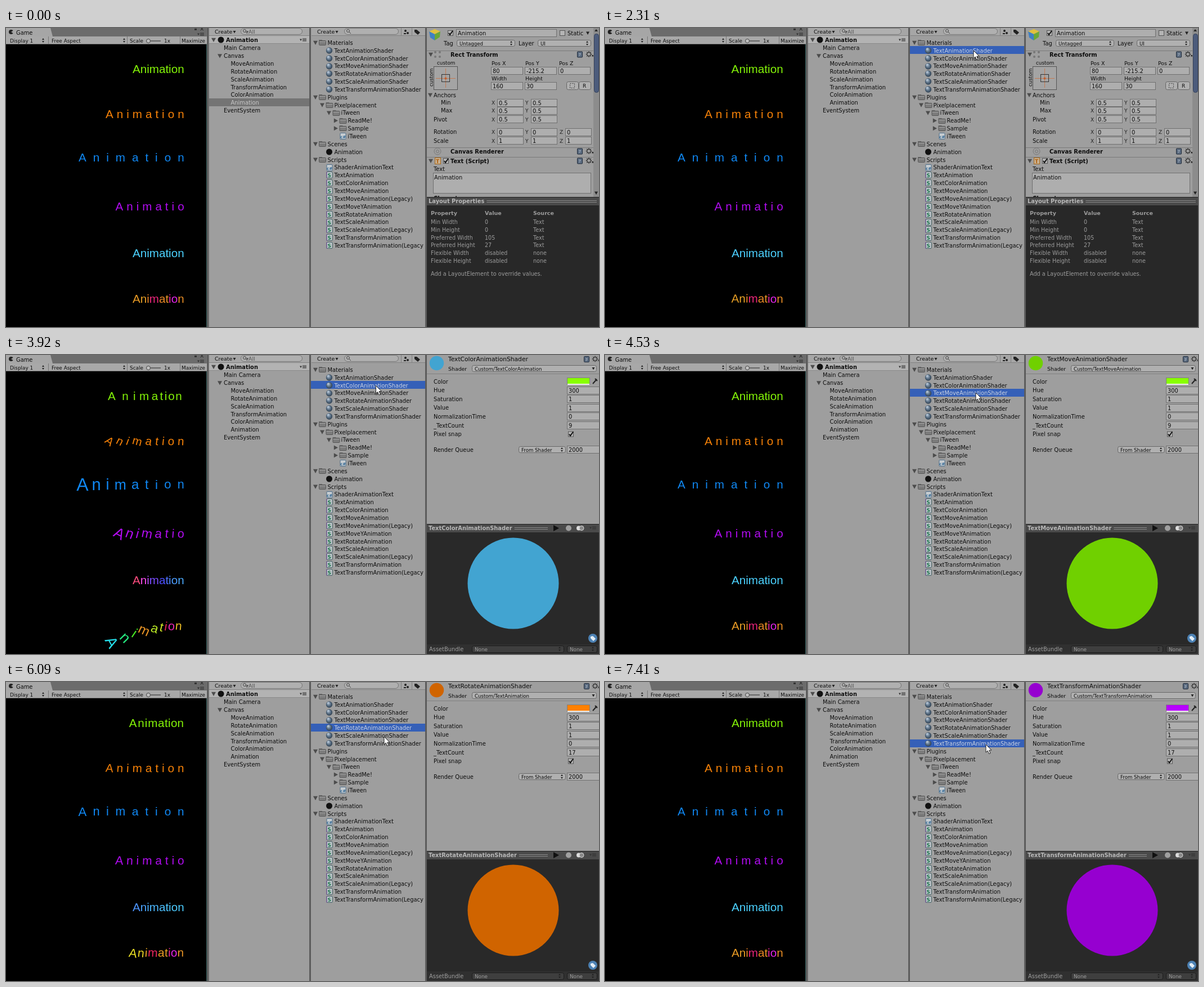
An HTML page with a canvas that plays this animation: 1054 by 531 pixels, repeating every 7720 ms.

```html
<!DOCTYPE html>
<html>
<head>
<meta charset="utf-8">
<style>
html, body { margin: 0; width: 100%; height: 100%; overflow: hidden; background: #000; }
canvas { display: block; width: 1054px; height: 531px; }
</style>
</head>
<body>
<canvas id="stage" width="1054" height="531"></canvas>
<script>
const g = document.getElementById('stage').getContext('2d');
const LOOP = 7720;
const UI = '"DejaVu Sans", Verdana, sans-serif';
const GAME = '"Liberation Sans", Arial, sans-serif';
const INK = '#0c0c0c';

// ---- drawing helpers ----
function box(x, y, w, h, fill, line) {
  g.fillStyle = fill;
  g.fillRect(x, y, w, h);
  if (line) {
    g.strokeStyle = line;
    g.lineWidth = 1;
    g.strokeRect(x + .5, y + .5, w - 1, h - 1);
  }
}
function pill(x, y, w, h, fill, line, r = 3) {
  g.beginPath();
  g.roundRect(x + .5, y + .5, w - 1, h - 1, r);
  g.fillStyle = fill;
  g.fill();
  g.strokeStyle = line;
  g.lineWidth = 1;
  g.stroke();
}
function txt(s, x, y, color = INK, size = 9.9, weight = '') {
  g.font = `${weight} ${size}px ${UI}`;
  g.fillStyle = color;
  g.fillText(s, x, Math.round(y + 3.5));
}
const bold = (s, x, y, color, size = 9.9) => txt(s, x, y, color, size, 'bold');
function poly(pts, fill, line, lw = 1) {
  g.beginPath();
  pts.forEach(([x, y]) => g.lineTo(x, y));
  g.closePath();
  if (fill) { g.fillStyle = fill; g.fill(); }
  if (line) { g.strokeStyle = line; g.lineWidth = lw; g.stroke(); }
}
function disc(x, y, r, fill, line) {
  g.beginPath();
  g.arc(x, y, r, 0, 7);
  if (fill) { g.fillStyle = fill; g.fill(); }
  if (line) { g.strokeStyle = line; g.lineWidth = 1; g.stroke(); }
}
const down = (x, y, r = 4, c = '#4c4c4c') => poly([[x - r, y - r * .8], [x + r, y - r * .8], [x, y + r]], c);
const right = (x, y, r = 4, c = '#4c4c4c') => poly([[x - r * .8, y - r], [x - r * .8, y + r], [x + r, y]], c);
function upDown(x, y) {
  poly([[x - 2, y - 1], [x + 2, y - 1], [x, y - 4]], '#222');
  poly([[x - 2, y + 1], [x + 2, y + 1], [x, y + 4]], '#222');
}
function field(s, x, y, w, h = 14) {
  y = Math.round(y);
  box(x, y - h / 2, w, h, '#aeaeae', '#707070');
  txt(s, x + 3, y);
}
function popup(s, x, y, w, size = 8.6) {
  pill(x, y - 6, w, 12, '#b0b0b0', '#686868');
  txt(s, x + 5, y, INK, size);
  upDown(x + w - 7, y);
}
function check(x, y, on) {
  box(x - 5, y - 5, 10, 10, '#b4b4b4', '#555');
  if (!on) return;
  g.beginPath();
  g.moveTo(x - 3, y);
  g.lineTo(x - 1, y + 3);
  g.lineTo(x + 4, y - 4);
  g.strokeStyle = '#111';
  g.lineWidth = 2;
  g.stroke();
}
function magnifier(x, y) {
  disc(x, y, 2.5, null, '#444');
  poly([[x + 2, y + 2], [x + 5, y + 5]], null, '#444');
}
function gear(x, y) {
  disc(x, y, 3.2, null, '#222');
  for (let i = 0; i < 8; i++) {
    const a = i * Math.PI / 4;
    box(x + 4.4 * Math.cos(a) - .7, y + 4.4 * Math.sin(a) - .7, 1.5, 1.5, '#222');
  }
  down(x + 7, y + 3, 2, '#222');
}
function book(x, y) {
  pill(x - 4, y - 5, 10, 11, '#5c6c80', '#1d2838', 1);
  txt('?', x - 1, y, '#d5dde8', 7);
}
function menu(x, y) {
  down(x - 3, y, 2, '#333');
  for (let i = -1; i < 2; i++) box(x, y - .5 + 2 * i, 7, 1, '#333');
}

// ---- game view ----
const COLORS = ['#84f408', '#f78208', '#1088f4', '#b20cf2'];
const MIX = [36, 38, 28, 334, 30, 34, 322, 298, 32];
const ROWS = [
  { s: 'Animation', y: 73, gap: 0, move: 107 },
  { s: 'Animation', y: 153, gap: 6, turn: 90 },
  { s: 'Animation', y: 230, gap: 12, grow: 1.35 },
  { s: 'Animatio', y: 317, gap: 6, turn: 90, grow: 1 },
  { s: 'Animation', y: 399.5, gap: 0, hue: 360 },
  { s: 'Animation', y: 480.5, gap: 0, move: 107, turn: 150, grow: .9, swing: 32, hue: 360 }
];

// Offset of letter i: 1 at its start pose, 0 at rest. Last letter leads.
function offset(t, i, n) {
  if (t < 80) return 0;
  const u = ((t + 364) % 1000 - (n - 1 - i) * 26) / 600;
  if (t >= 7410 || u >= 1) return 0;
  return u <= 0 ? 1 : 2 ** (-10 * u);
}
function letters(t) {
  g.font = `20.6px ${GAME}`;
  ROWS.forEach((r, k) => {
    const n = r.s.length;
    const widths = [...r.s].map(c => g.measureText(c).width);
    let x = 316.6 - widths.reduce((a, b) => a + b, 0) - r.gap * (n - 1);
    widths.forEach((w, i) => {
      const e = offset(t, i, n), scale = 1 + (r.grow || 0) * e;
      g.save();
      g.translate(x + w / 2 - (r.move || 0) * e, r.y + (r.swing || 0) * Math.sin(Math.PI * e) ** 2);
      g.rotate((r.turn || 0) * e * Math.PI / 180);
      g.scale(scale, scale);
      g.fillStyle = k < 4 ? COLORS[k]
        : k === 4 ? `hsl(${195 + r.hue * e},100%,65%)`
        : `hsl(${MIX[i] + r.hue * e},82%,53%)`;
      g.fillText(r.s[i], -w / 2, 7);
      g.restore();
      x += w + r.gap;
    });
  });
}
function gamePane(t) {
  box(0, 0, 357, 531, '#000');
  g.save();
  g.beginPath();
  g.rect(0, 29, 356, 502);
  g.clip();
  letters(t);
  g.restore();
  box(0, 0, 357, 15, '#6c6c6c');
  poly([[0, 0], [79, 0], [83, 15], [0, 15]], '#a6a6a6');
  disc(9, 7, 4, '#222');
  poly([[9, 7], [14, 4], [14, 10]], '#a6a6a6');
  txt('Game', 18, 8.5);
  box(335, 1, 4, 3, '#333');
  txt('×', 344, 1, '#222', 10);
  menu(345, 11);
  box(0, 15, 357, 14, '#a8a8a8');
  box(0, 28, 357, 1, '#707070');
  txt('Display 1', 7, 22, INK, 8.9);
  upDown(66, 22);
  box(75, 15, 1, 13, '#777');
  txt('Free Aspect', 81, 22, INK, 8.9);
  upDown(210, 22);
  box(215, 15, 1, 13, '#777');
  txt('Scale', 220, 22.5, INK, 8.9);
  box(249, 22, 26, 2, '#666');
  disc(253, 23, 3.5, '#c0c0c0', '#444');
  txt('1x', 281, 22.5, INK, 8.9);
  box(309, 15, 1, 13, '#777');
  txt('Maximize', 312, 22, INK, 8.9);
  box(356, 29, 1, 502, '#285452');
  box(357, 0, 4, 531, '#6f6f6f');
  box(358, 0, 1, 531, '#464646');
}

// ---- hierarchy and project ----
const STEP = 13.87;
const picked = t => [2200, 3150, 4200, 5000, 6170, 7100].filter(v => t >= v).length;

function toolbar(x, w, search) {
  box(x, 0, w, 14, '#a6a6a6');
  box(x, 13, w, 1, '#828282');
  txt('Create', x + 10, 6.5, INK, 9.4);
  down(x + 45, 7, 2.5, '#222');
  pill(search[0], 0, search[1], 12, '#b0b0b0', '#777', 6);
  magnifier(search[0] + 7, 5);
}
function hierarchy(t) {
  box(361, 0, 178, 531, '#9e9e9e');
  toolbar(361, 178, [417, 110]);
  down(429, 7, 2, '#444');
  txt('All', 431, 6, '#505050', 9.4);
  box(361, 14, 178, 14, '#b3b3b3');
  box(361, 27, 178, 1, '#8a8a8a');
  down(369, 21);
  disc(382, 21, 5.5, '#111');
  bold('Animation', 391, 21.5);
  menu(527, 21);
  if (!picked(t)) box(361, 125, 178, 14, '#747474');
  ['Main Camera', 'Canvas', 'MoveAnimation', 'RotateAnimation', 'ScaleAnimation',
    'TransformAnimation', 'ColorAnimation', 'Animation', 'EventSystem'].forEach((s, i) => {
    const y = 35.7 + STEP * i, child = i > 1 && i < 8;
    if (i === 1) down(380, y);
    txt(s, child ? 399.5 : 387, y, i === 7 && !picked(t) ? '#c8c8c8' : INK);
  });
  box(539, 0, 3, 531, '#5c5c5c');
}

const TREE = `0dMaterials|1mTextAnimationShader|1mTextColorAnimationShader|1mTextMoveAnimationShader
1mTextRotateAnimationShader|1mTextScaleAnimationShader|1mTextTransformAnimationShader
0dPlugins|1dPixelplacement|2diTween|3fReadMe!|3fSample|3ciTween|0dScenes|1uAnimation|0dScripts
1cShaderAnimationText|1sTextAnimation|1sTextColorAnimation|1sTextMoveAnimation
1sTextMoveAnimation(Legacy)|1sTextMoveYAnimation|1sTextRotateAnimation|1sTextScaleAnimation
1sTextScaleAnimation(Legacy)|1sTextTransformAnimation|1sTextTransformAnimation(Legacy`.split(/[|\n]/);

function icon(kind, x, y) {
  if (kind === 'm') {
    const shade = g.createRadialGradient(x - 2, y - 3, 1, x, y, 6);
    shade.addColorStop(0, '#b4c4d4');
    shade.addColorStop(.5, '#5c7288');
    shade.addColorStop(1, '#2c3c4c');
    disc(x, y, 5.7, shade);
  } else if (kind === 'd' || kind === 'f') {
    box(x - 6, y - 5, 6, 3, '#686868');
    pill(x - 6, y - 4, 13, 9, '#7c7c7c', '#555', 1);
    box(x - 5, y - 2, 11, 1, '#a0a0a0');
  } else if (kind === 'u') {
    disc(x, y, 5.5, '#111');
  } else {
    const c = kind === 'c';
    pill(x - 5, y - 6, 11, 12, '#c6ccd0', c ? '#4c6c88' : '#3c5c60', 1);
    bold(c ? 'c#' : 'S', x - (c ? 4.5 : 3), y, c ? '#2a6290' : '#187048', c ? 7 : 9);
    if (!c) box(x - 5, y - 6, 1, 12, '#8050a0');
  }
}
function project(t) {
  box(542, 0, 203, 531, '#9e9e9e');
  toolbar(543, 202, [601, 97]);
  box(702, 0, 1, 13, '#808080');
  box(721, 0, 1, 13, '#808080');
  disc(710, 5, 2, '#222');
  disc(714, 9, 2, '#222');
  box(707, 9, 4, 2, '#222');
  poly([[726, 3], [730, 3], [736, 8], [732, 12], [726, 7]], '#222');
  const row = picked(t);
  g.save();
  g.beginPath();
  g.rect(542, 14, 203, 517);
  g.clip();
  if (row) box(542, Math.floor(19 + 13.85 * row), 203, 14, '#3560b8');
  TREE.forEach((s, i) => {
    const y = 26 + 13.85 * i, x = 562 + 12 * s[0], kind = s[1];
    if (kind === 'd') down(x - 12, y);
    if (kind === 'f') right(x - 12, y);
    icon(kind, x + (s[0] > 0 ? .5 : 0), Math.round(y));
    txt(s.slice(2), x + 9.5, y + .3, row && i === row ? '#ccd4e4' : INK);
  });
  g.restore();
  box(745, 0, 3, 531, '#5c5c5c');
}

// ---- inspector ----
function header(s, y, line = true) {
  if (line) box(748, Math.round(y - 8), 296, 1, '#7a7a7a');
  bold(s, 790, y);
  book(1019, y - 1);
  gear(1036, y - 1);
}
function axes(label, y, values, tx = 760) {
  txt(label, tx, y);
  values.forEach((v, i) => {
    const x = [863, 923, 984][i];
    txt('XYZ'[i], x, y, '#222', 9);
    field(v, x + 10, y, 47);
  });
}
function objectView() {
  poly([[762, 2], [772, 6], [762, 11], [752, 6]], '#e0c040');
  poly([[752, 6], [762, 11], [762, 22], [754, 17]], '#4080c4');
  poly([[772, 6], [762, 11], [762, 22], [771, 16]], '#68a838');
  check(790, 9, true);
  field('Animation', 800, 9, 179);
  check(989, 9, false);
  txt('Static', 998, 9);
  down(1034, 9, 3, '#222');
  txt('Tag', 778, 27);
  popup('Untagged', 801, 27, 104);
  txt('Layer', 911, 27);
  popup('UI', 945, 27, 95);
  down(755, 47);
  for (const [x, y] of [[-4, -4], [4, -4], [-4, 4], [4, 4]]) disc(767 + x, 47 + y, 2, '#777');
  header('Rect Transform', 47.5);
  txt('custom', 766, 61.5, INK, 8.8);
  g.save();
  g.translate(755, 104);
  g.rotate(-Math.PI / 2);
  txt('custom', 0, 0, INK, 8.8);
  g.restore();
  box(760, 68, 43, 42, '#a4a4a4', '#555');
  box(764, 89, 35, 1, '#c47850');
  box(781, 72, 1, 34, '#c47850');
  g.strokeStyle = '#333';
  g.strokeRect(774.5, 82.5, 14, 13);
  disc(781.5, 89.5, 2, '#c06030');
  [['Pos X', '80'], ['Pos Y', '-215.2'], ['Pos Z', '0']].forEach(([s, v], i) => {
    txt(s, 863 + 60 * i, 62, INK, 9.4);
    field(v, 862 + 60 * i, 75.5, 57);
  });
  [['Width', '160'], ['Height', '30']].forEach(([s, v], i) => {
    txt(s, 863 + 60 * i, 89.5, INK, 9.4);
    field(v, 862 + 60 * i, 103, 57);
  });
  pill(996, 95, 22, 15, '#b0b0b0', '#666');
  pill(1018, 95, 22, 15, '#b0b0b0', '#666');
  g.setLineDash([2, 2]);
  g.strokeStyle = '#333';
  g.strokeRect(1002.5, 98.5, 8, 8);
  g.setLineDash([]);
  txt('R', 1025, 102.5, INK, 9);
  down(754, 119);
  axes('Anchors', 119, []);
  axes('Min', 132.5, ['0.5', '0.5'], 773);
  axes('Max', 146.5, ['0.5', '0.5'], 773);
  axes('Pivot', 162, ['0.5', '0.5']);
  axes('Rotation', 184.5, ['0', '0', '0']);
  axes('Scale', 200, ['1', '1', '1']);
  disc(767, 219, 6, null, '#777');
  disc(767, 219, 2.5, null, '#777');
  header('Canvas Renderer', 219.5);
  down(755, 236);
  box(762, 230, 11, 12, '#c8b090', '#a86818');
  bold('T', 764, 236, '#b06010', 9);
  check(782, 236, true);
  header('Text (Script)', 236.5);
  txt('Text', 760, 250.5);
  box(759, 257, 281, 37, '#aeaeae', '#707070');
  txt('Animation', 761, 265);
  g.save();
  g.beginPath();
  g.rect(748, 296, 296, 4);
  g.clip();
  bold('Character', 760, 302);
  g.restore();
  box(1044, 0, 10, 300, '#8c8c8c');
  down(1049, 293, 3, '#222');
  pill(1045, 10, 9, 105, '#4c5c7c', '#35415c', 4);
  poly([[1046, 6], [1052, 6], [1049, 2]], '#222');

  box(748, 300, 306, 231, '#282828');
  titleBar('Layout Properties', 1050);
  const cols = [755, 851, 937], grey = '#9c9c9c';
  ['Property', 'Value', 'Source'].forEach((s, i) => bold(s, cols[i], 328.5, grey, 9.5));
  ['Min Width,0,Text', 'Min Height,0,Text', 'Preferred Width,105,Text', 'Preferred Height,27,Text',
    'Flexible Width,disabled,none', 'Flexible Height,disabled,none'].forEach((line, i) =>
    line.split(',').forEach((s, c) => txt(s, cols[c], 344.3 + STEP * i, grey, 9.6)));
  txt('Add a LayoutElement to override values.', 755, 436, grey, 9.7);
}
function titleBar(s, end) {
  box(748, 300, 306, 15, '#4a4a4a');
  box(748, 300, 306, 1, '#222');
  bold(s, 751, 307.5, '#b8b8b8');
  const x = 755 + g.measureText(s).width;
  box(x, 306, end - x, 1, '#8a8a8a');
  box(x, 309, end - x, 1, '#8a8a8a');
}

const MATERIALS = [
  { at: 2380, name: 'Text', shader: 'Text', swatch: '#ff8000', ball: 'stripes', count: 9 },
  { at: 3460, name: 'TextColor', swatch: '#88ff00', ball: '#42a4d1', count: 9 },
  { at: 4530, name: 'TextMove', swatch: '#88ff00', ball: '#70d000', count: 9 },
  { at: 5160, name: 'TextRotate', shader: 'Text', swatch: '#ff8000', ball: '#d06400', count: 17 },
  { at: 6320, name: 'TextScale', swatch: '#0088ff', ball: '#0070d0', count: 17 },
  { at: 7250, name: 'TextTransform', swatch: '#b800ff', ball: '#9600d0', count: 17 }
];
const STRIPES = [[200, 98, 6], [208, 48, 208], [20, 145, 205], [32, 182, 8]];
function stripe(phase) {
  const i = Math.floor(phase), f = phase - i;
  const a = STRIPES[(i + 8) % 4], b = STRIPES[(i + 9) % 4];
  return `rgb(${a.map((v, c) => v + (b[c] - v) * f)})`;
}
// Meridian stripes: each longitude is half an ellipse, wide ones first.
function ball(x, y, r, fill) {
  if (fill !== 'stripes') return disc(x, y, r, fill);
  for (const left of [true, false]) {
    for (let a = 90; a > 0; a--) {
      g.beginPath();
      g.ellipse(x, y, r * Math.sin(a * Math.PI / 180), r, 0, -Math.PI / 2, Math.PI / 2, left);
      g.fillStyle = stripe(left ? 1 - (a + 4) / 20 : (a - 8) / 20.5);
      g.fill();
    }
  }
}
function materialView(m) {
  const title = m.name + 'AnimationShader';
  ball(765.5, 14.5, 12.7, m.ball);
  txt(title, 786, 7.5, INK, 10.7);
  book(1031, 7);
  gear(1047, 7);
  txt('Shader', 786, 24, INK, 9.4);
  pill(828, 18, 222, 12, '#b0b0b0', '#686868');
  txt(`Custom/${m.shader || m.name}Animation`, 833, 24, INK, 8.6);
  down(1044, 24, 2.5, '#222');
  box(748, 33, 306, 1, '#808080');
  ['Color', 'Hue', 'Saturation', 'Value', 'NormalizationTime', '_TextCount', 'Pixel snap']
    .forEach((s, i) => txt(s, 760, 47 + 15.6 * i));
  box(997, 40, 41, 13, m.swatch, '#808080');
  box(998, 51, 39, 2, '#f0f0f0');
  poly([[1043, 51], [1050, 43]], null, '#222', 2);
  poly([[1047, 42], [1051, 46]], null, '#222', 2);
  ['300', '1', '1', '0', m.count].forEach((v, i) => field(v, 997, 62.5 + 15.6 * i, 60));
  check(1004, 140.5, true);
  txt('Render Queue', 760, 168);
  popup('From Shader', 911, 168, 84);
  field('2000', 997, 168, 60);

  box(748, 300, 306, 231, '#292929');
  titleBar(title, 963);
  poly([[973, 302], [973, 313], [983, 307.5]], '#111');
  disc(1000, 307.5, 5, '#a0a0a0');
  disc(1018, 307.5, 4, '#ddd');
  disc(1023, 307.5, 4, '#888', '#ddd');
  menu(1042, 307);
  ball(901.5, 405.5, 81, m.ball);
  disc(1043, 503, 8, '#4d82b4');
  poly([[1039, 500], [1043, 499], [1048, 504], [1044, 508], [1039, 503]], '#e4edf5');
  box(748, 514, 306, 17, '#303030');
  txt('AssetBundle', 752, 522.5, '#a0a0a0');
  for (const [x, w] of [[828, 164], [997, 54]]) {
    pill(x, 516, w, 13, '#3e3e3e', '#1c1c1c');
    txt('None', x + 5, 522, '#a0a0a0', 8.8);
    upDown(x + w - 8, 522);
  }
}
function inspector(t) {
  box(748, 0, 306, 300, '#9e9e9e');
  const m = MATERIALS.filter(v => t >= v.at).pop();
  if (m) materialView(m);
  else objectView();
}

// ---- pointer: time, x, y ----
const PATH = [
  [80, 1046, 240], [600, 1015, 150], [900, 940, 60], [1150, 489, 55], [1550, 500, 53],
  [1950, 640, 44], [2200, 655, 40], [2900, 655, 41], [3150, 657, 51], [3800, 657, 51],
  [4200, 659, 67], [4700, 659, 67], [5000, 665, 81], [5700, 666, 83], [6090, 672, 97],
  [6700, 673, 97], [7100, 677, 111], [7720, 677, 111]
];
function pointer(t) {
  if (t < PATH[0][0]) return;
  const i = PATH.findIndex(p => p[0] > t), a = PATH[i - 1], b = PATH[i];
  const u = (t - a[0]) / (b[0] - a[0]), k = u * u * (3 - 2 * u);
  g.save();
  g.translate(a[1] + (b[1] - a[1]) * k, a[2] + (b[2] - a[2]) * k);
  poly([[0, 0], [0, 14], [3.2, 11], [5.5, 16.5], [8, 15.5], [5.7, 10.2], [10, 10]], '#fff', '#222');
  g.restore();
}

const start = performance.now();
function frame() {
  const t = (performance.now() - start) % LOOP;
  gamePane(t);
  hierarchy(t);
  project(t);
  inspector(t);
  pointer(t);
  requestAnimationFrame(frame);
}
frame();
</script>
</body>
</html>
```
